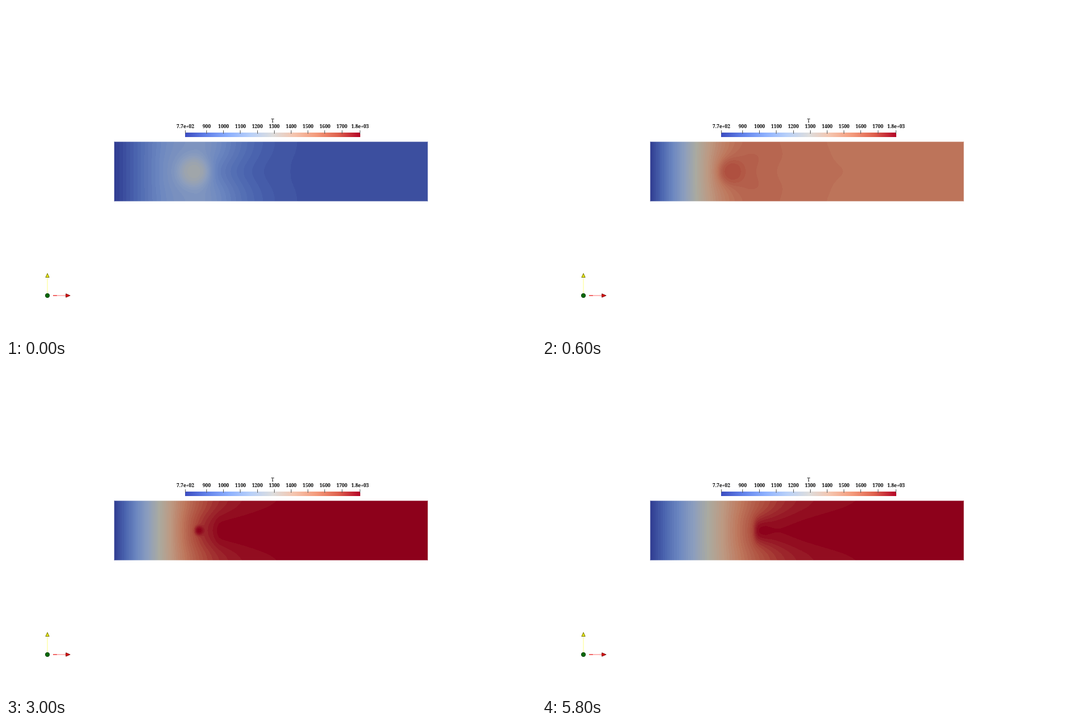
An HTML page with a canvas that plays this animation: 947 px wide and 591 px high, repeating every 6000 ms.

```html
<!DOCTYPE html>
<html lang="en">
<head>
<meta charset="utf-8">
<title>Temperature field</title>
<style>
html, body { margin: 0; width: 100%; height: 100%; overflow: hidden; background: #fff; }
canvas { display: block; }
</style>
</head>
<body>
<canvas id="stage" width="947" height="591"></canvas>
<script>
const ctx = document.getElementById('stage').getContext('2d');
const LOOP = 6000, STEP = 100, LEVELS = 50;
const BOX = { x: 193, y: 242, w: 561, h: 107 };

// Evenly spaced colour stops, cold to hot: the legend and the shaded surface
const LEGEND = ['#3b4cc0', '#6282ea', '#8db0fe', '#b8d0f9', '#dddddd', '#f5c4ad', '#f49a7b', '#de604d', '#b40426'];
const SURFACE = ['#2e3a90', '#4b65af', '#6c87c0', '#8c9ebe', '#aaaaa0', '#bd9982', '#be785d', '#ad4b3c', '#8d011b'];

const clamp = v => Math.max(0, Math.min(1, v));
const mix = (a, b, k) => a + (b - a) * k;
const bell = (d, power) => Math.exp(-(Math.abs(d) ** power));

// Follows the smaller of two values; a higher n gives a sharper knee
const softMin = (a, b, n) => a / (1 + (a / b) ** n) ** (1 / n);

function shade(v) {
  const i = Math.min(SURFACE.length - 2, Math.floor(v * (SURFACE.length - 1)));
  const k = v * (SURFACE.length - 1) - i;
  return [1, 3, 5].map(c =>
    mix(parseInt(SURFACE[i].substr(c, 2), 16), parseInt(SURFACE[i + 1].substr(c, 2), 16), k));
}
const palette = Array.from({ length: LEVELS + 1 }, (_, i) => shade(i / LEVELS));

// How the gas heats up over time; the flame front finally retreats downstream
function stateAt(t) {
  const cooling = Math.exp(-t / 430);
  const retreat = clamp((t - 4100) / 300) ** 2;
  return {
    plateau: 1 - .94 * cooling,
    peak: 1 - .54 * cooling,
    hump: .27 * Math.exp(-t / 500),
    rampLength: 161 + 159 * Math.exp(-t / 150) + 46 * retreat,
    spotX: 348 - 12 * Math.exp(-t / 2000),
    spotRadius: 28 * Math.exp(-t / 2500) * Math.sqrt(1 - retreat),
    kernelX: 376 + 5 * retreat
  };
}

function temperature(x, dy, s) {
  const reach = bell(dy / 28, 2);
  const tail = Math.max(0, x - 342 + 20 * reach);
  const ceiling = s.plateau + s.hump * bell(tail / 85, 1.6);
  let v = softMin((x - BOX.x) / s.rampLength, ceiling, 5 + 5 * reach);

  const ignition = 1 / (1 + Math.exp((s.kernelX - x) / 3));
  const lift = ignition * bell(dy / 21, 2) * Math.exp(-Math.max(0, x - 400) / 60);
  v += Math.max(0, Math.min(1, s.plateau + .02) - v) * lift;

  if (s.spotRadius > 0) {
    const glow = bell(Math.hypot(x - s.spotX, dy) / s.spotRadius, 3);
    v = mix(v, Math.max(v, s.peak), glow * Math.min(1, s.spotRadius / 6));
  }
  return clamp(v);
}

const field = ctx.createImageData(BOX.w, BOX.h);

function paintField(t) {
  const state = stateAt(t);
  for (let j = 0; j < BOX.h; j++) {
    for (let i = 0; i < BOX.w; i++) {
      const v = temperature(BOX.x + i + .5, j + .5 - BOX.h / 2, state);
      const [r, g, b] = palette[Math.round(v * LEVELS)];
      const rim = i === 0 || j === 0 || i === BOX.w - 1 || j === BOX.h - 1;
      field.data.set([r, g, b, rim ? 150 : 255], (j * BOX.w + i) * 4);
    }
  }
  ctx.putImageData(field, BOX.x, BOX.y);
}

function line(x1, y1, x2, y2, color) {
  ctx.strokeStyle = color;
  ctx.lineWidth = 1;
  ctx.beginPath();
  ctx.moveTo(x1, y1);
  ctx.lineTo(x2, y2);
  ctx.stroke();
}

function fillAndEdge(fill, edge) {
  ctx.fillStyle = fill;
  ctx.fill();
  ctx.strokeStyle = edge;
  ctx.lineWidth = 1;
  ctx.stroke();
}

function cone(points, fill, edge) {
  ctx.beginPath();
  points.forEach(([x, y]) => ctx.lineTo(x, y));
  ctx.closePath();
  fillAndEdge(fill, edge);
}

function paintLegend() {
  const bar = ctx.createLinearGradient(320, 0, 633, 0);
  LEGEND.forEach((color, i) => bar.addColorStop(i / (LEGEND.length - 1), color));
  ctx.fillStyle = bar;
  ctx.fillRect(320, 226, 313, 8);

  ctx.fillStyle = '#000';
  ctx.textAlign = 'center';
  ctx.font = '8.7px "Noto Serif", serif';
  ctx.fillText('T', 476.5, 207.5);
  ctx.font = 'bold 8.6px "Noto Serif", serif';
  const mark = (label, x) => {
    ctx.fillText(label, x, 217.8);
    line(Math.floor(x) + .5, 222, Math.floor(x) + .5, 228, '#555');
  };
  mark('7.7e+02', 320.5);
  for (let v = 900; v <= 1700; v += 100) mark(String(v), 358.5 + (v - 900) * .302);
  mark('1.8e+03', 632.7);
}

function paintAxes() {
  line(74, 486, 74, 513, '#ffff80');
  cone([[74, 477.5], [70.8, 484.5], [77.2, 484.5]], '#e8e800', '#77770a');
  line(84, 517, 107, 517, '#ff7070');
  line(84, 517, 91, 517, '#e01818');
  cone([[114.5, 517], [107, 513.8], [107, 520.2]], '#e00c0c', '#7c1010');
  ctx.beginPath();
  ctx.arc(74, 517, 3.7, 0, Math.PI * 2);
  fillAndEdge('#006c00', '#073c07');
}

ctx.fillStyle = '#fff';
ctx.fillRect(0, 0, 947, 591);
paintLegend();
paintAxes();

const start = performance.now();
let shown = -1;
function tick() {
  const t = Math.floor(((performance.now() - start) % LOOP) / STEP) * STEP;
  if (t !== shown) paintField(shown = t);
  requestAnimationFrame(tick);
}
tick();
</script>
</body>
</html>
```
